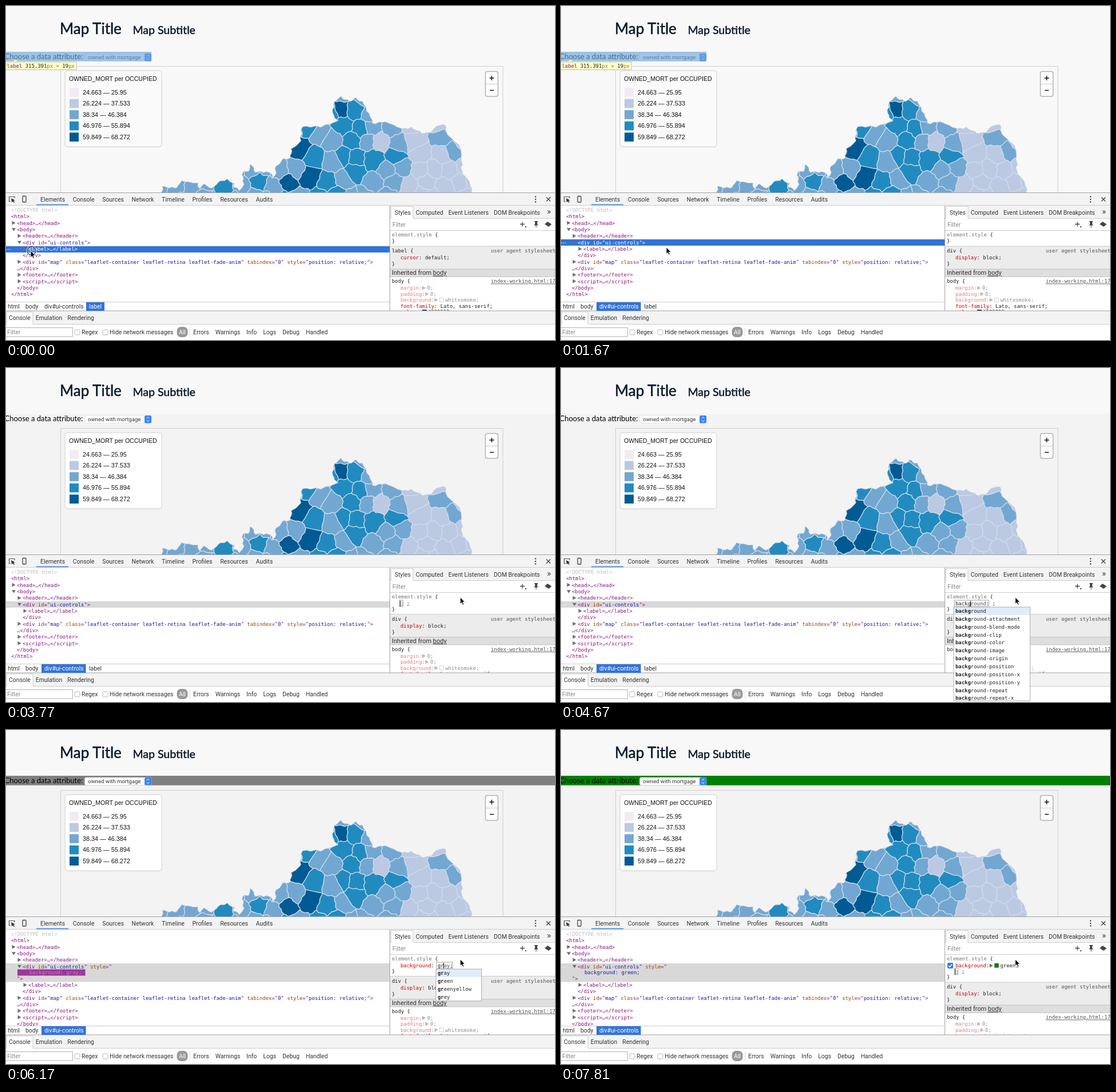
Write an HTML page that moves like this. It is 959 px wide and 584 px high and loops after 8000 ms.

```html
<!DOCTYPE html>
<html lang="en">
<head>
<meta charset="utf-8">
<title>Inspecting a map page</title>
<style>
html, body { margin: 0; width: 100%; height: 100%; overflow: hidden; background: #f8f8f8; }
#stage { position: absolute; left: 0; top: 0; display: block; }
text { white-space: pre; }
.ui { font-family: Roboto, sans-serif; font-size: 10.4px; fill: #333; }
.code { font-family: "DejaVu Sans Mono", monospace; font-size: 8.93px; fill: #222; }
.page { font-family: Lato, sans-serif; fill: #0a1929; }
.legend { font-family: "Liberation Sans", Arial, sans-serif; font-size: 10.8px; fill: #111; }
</style>
</head>
<body>
<svg id="stage" width="959" height="584" viewBox="0 0 959 584"></svg>
<script>
const LOOP = 8000, STEP = 150, CH = 5.377, ROW = 11.33;
const PURPLE = '#881280', BLUE = '#3273d8', RED = '#c80000';
const PALE = '#f1ebf4', LIGHT = '#bcc9e3', MID = '#72a7d2', DEEP = '#218bc0', DARK = '#005b94';

// Markup helpers
const esc = s => s.replace(/</g, '&lt;').replace(/>/g, '&gt;');
const rect = (x, y, w, h, fill, more = '') =>
  `<rect x="${x}" y="${y}" width="${w}" height="${h}" fill="${fill}" ${more}/>`;
const dot = (x, y, r, fill, more = '') => `<circle cx="${x}" cy="${y}" r="${r}" fill="${fill}" ${more}/>`;
const path = (d, fill, more = '') => `<path d="${d}" fill="${fill}" ${more}/>`;
const line = (d, color, width = 1) => path(d, 'none', `stroke="${color}" stroke-width="${width}"`);
const rule = (y, color, x = 0, end = 959) => line(`M${x} ${y}H${end}`, color);
const raw = (cls, x, y, s, more = '') => `<text class="${cls}" x="${x}" y="${y}" ${more}>${s}</text>`;
const ink = c => c ? `style="fill:${c}"` : '';
const ui = (x, y, s, color) => raw('ui', x, y, esc(s), ink(color));
const code = (x, y, s, color) => raw('code', x, y, esc(s), ink(color));
const flow = (x, y, gap, names) => raw('ui', x, y, names.split(', ').join(`<tspan dx="${gap}"></tspan>`)
  .replace(/<\/tspan>([^<]*)/g, '$1</tspan>'));
const span = (s, c) => `<tspan style="fill:${c}">${s}</tspan>`;
const tint = s => esc(s).replace(/([\w-]+)="([^"]*)("?)/g,
  (_, name, value, end) => `${span(name, '#994500')}="${span(value, '#1a1aa6')}${end}`);
const clip = (x, y, w, h, body) =>
  `<svg x="${x}" y="${y}" width="${w}" height="${h}" viewBox="${x} ${y} ${w} ${h}">${body}</svg>`;
const tri = (x, y, open) => path(open ? `M${x} ${y - 2.5}h7l-3.5 5.5z` : `M${x + .5} ${y - 3.5}l6 3.5-6 3.5z`, '#6e6e6e');
const box = (x, y) => rect(x, y, 9, 9, '#fff', 'rx="1.5" stroke="#b5b5b5"');

// Map: Voronoi counties clipped to the coast line
const COAST = '272 327 274 316 288 318 300 317 306 306 334 310 338 318 347 312 360 320 370 308 385 303 398 310 398 317 408 322 415 313 413 291 423 288 428 278 436 290 463 291 466 301 471 297 471 281 485 268 497 266 499 251 514 237 517 211 549 211 580 201 570 188 574 166 584 159 600 167 608 161 622 167 634 188 641 206 662 202 692 215 708 213 727 222 739 222 757 208 767 209 770 224 793 245 797 277 795 286 812 314 814 327';
const KEYS = [
  { fill: DARK, at: '586 180 513 251 490 306 530 297' },
  { fill: DEEP, at: '607 181 620 216 440 306 380 316' },
  { fill: MID, at: '764 229 781 254 548 221 572 272' },
  { fill: LIGHT, at: '652 237' }
];
const pairs = s => s.match(/\d+ \d+/g).map(p => p.split(' ').map(Number));
let seed = 11;
const random = () => (seed = seed * 16807 % 2147483647) / 2147483647;

function countyColor(x, y) {
  if (x > 697) return LIGHT;
  const core = Math.hypot((x - 575) / 70, (y - 255) / 95) < 1;
  return random() < (core ? .87 : .06) ? DEEP : MID;
}
function makeSites() {
  const sites = KEYS.flatMap(k => pairs(k.at).map(([x, y]) => ({ x, y, fill: k.fill })));
  for (let row = 0; row < 8; row++) {
    for (let col = 0; col < 20; col++) {
      const x = 268 + (col + row % 2 / 2) * 29 + (random() - .5) * 16;
      const y = 160 + row * 25 + (random() - .5) * 14;
      if (sites.every(s => Math.hypot(s.x - x, s.y - y) > 19)) sites.push({ x, y, fill: countyColor(x, y) });
    }
  }
  return sites;
}
function cut(poly, s, q) {
  const side = ([x, y]) => (x - (s.x + q.x) / 2) * (q.x - s.x) + (y - (s.y + q.y) / 2) * (q.y - s.y);
  return poly.flatMap((a, i) => {
    const b = poly[(i + 1) % poly.length], da = side(a), db = side(b), k = da / (da - db);
    const kept = da <= 0 ? [a] : [];
    if (da * db < 0) kept.push([a[0] + (b[0] - a[0]) * k, a[1] + (b[1] - a[1]) * k]);
    return kept;
  });
}
// Bends edges by position, so that neighbours stay joined
function shape(poly) {
  const points = poly.flatMap(([ax, ay], i) => {
    const [bx, by] = poly[(i + 1) % poly.length];
    return [0, .25, .5, .75].map(k => {
      const x = ax + (bx - ax) * k, y = ay + (by - ay) * k;
      return (x + 1.2 * Math.sin(y * .5 + x * .2)).toFixed(1) + ' ' + (y + 1.2 * Math.sin(x * .45)).toFixed(1);
    });
  });
  return `M${points.join('L')}Z`;
}
function makeMap() {
  const sites = makeSites(), coast = shape(pairs(COAST));
  const counties = sites.map(s => {
    const square = [[-60, -60], [60, -60], [60, 60], [-60, 60]].map(([x, y]) => [s.x + x, s.y + y]);
    const cell = sites.reduce((poly, q) => q === s ? poly : cut(poly, s, q), square);
    return path(shape(cell), s.fill, 'stroke="#d0dde9" stroke-width="1.2"');
  });
  return `<clipPath id="coast"><path d="${coast}"/></clipPath><g clip-path="url(#coast)">${counties.join('')}</g>` +
    line(coast, '#b9cde2', .8);
}
const MAP = makeMap();

const CLASSES = { '24.663 — 25.95': PALE, '26.224 — 37.533': LIGHT, '38.34 — 46.384': MID, '46.976 — 55.894': DEEP, '59.849 — 68.272': DARK };
const LEGEND = raw('legend', 110, 131, 'OWNED_MORT per OCCUPIED', 'style="font-size:10.54px"') +
  Object.entries(CLASSES).map(([s, c], i) => rect(111, 143 + i * 19.6, 16, 15.6, c) + raw('legend', 134, 154.5 + i * 19.6, s)).join('');
const title = (x, size, s) => raw('page', x, 49.3, s, `style="font-size:${size}px" stroke="#0a1929" stroke-width=".5"`);
const HEADING = title(94, 26, 'Map Title') + title(221.5, 19.5, 'Map Subtitle');
const ZOOM = rect(837.5, 114.5, 22, 43.5, '#fff', 'rx="3" stroke="#b4b4b4" stroke-width="1.6"') +
  rule(136.5, '#ccc', 838, 859) + line('M844.5 126h8M848.5 122v8M845 147.5h7', '#111', 1.5);
const SELECT = rect(137.5, 83, 116.5, 13.5, '#fff', 'rx="2.5" stroke="#d8d8d8" stroke-width=".6"') +
  raw('ui', 143, 93, 'owned with mortgage', 'style="font-size:9.55px"') +
  rect(242, 83, 12, 13.5, '#3b86f2', 'rx="2.5"') + line('M246 88l2-2.3 2 2.3M246 91.3l2 2.3 2-2.3', '#fff');

function tooltip(isDiv) {
  const y = isDiv ? 100 : 98, [w, h] = isDiv ? [1185, 21] : [315.391, 19];
  const name = isDiv ? span('div', PURPLE) + span('#ui-controls', '#1a1aa6') : span('label', PURPLE);
  return path(`M12 ${y}l4.5-4.5 4.5 4.5z`, '#ffffc8') +
    rect(-1, y, isDiv ? 161 : 124, 13.5, '#ffffc8', 'stroke="#b5b58c" stroke-width=".8"') +
    raw('code', 1.5, y + 10, `${name} ${w}${span('px × ', '#777')}${h}${span('px', '#777')}`);
}
function page({ hover, bar }) {
  let s = rect(0, 0, 959, 80, '#f8f8f8') + HEADING + rect(0, 80, 959, 247, hover ? '#f8f8f8' : '#f3f3f3') +
    line('M95.5 327V105.5H868V327', '#cfcfcf') + MAP +
    rect(102, 112, 171, 135.5, '#e4e4e4', 'rx="6"') + rect(104, 114, 167, 131, hover ? '#fafafa' : '#fff', 'rx="4"') + LEGEND + ZOOM;
  if (bar) s += rect(0, 80, 959, 16.7, bar);
  s += raw('page', -2.5, 92.5, 'Choose a data attribute:', 'style="font-size:13px;fill:#000"') + SELECT;
  if (hover) s += rect(0, 80, hover === 'div' ? 959 : 254, 16.7, 'rgba(111,168,220,.66)') + tooltip(hover === 'div');
  return s;
}

// Fixed parts of the tool window
const ICONS = line('M8 342H5.5V333.5H15V336', '#555', 1.2) + path('M9 336l7 4-3 .6 2 2.4-1.2 1-2-2.5-1.8 2z', '#333') +
  rect(29, 332.5, 6, 10.5, 'none', 'rx="1" stroke="#444" stroke-width="1.3"') +
  [-4.5, 0, 4.5].map(d => dot(925, 338 + d, 1.2, '#444')).join('') + line('M944 334.5l7 7m0-7l-7 7', '#444', 1.4) +
  raw('ui', 945, 364, '»', 'style="font-size:15px"') + line('M898 381.5h8M902 377.5v8', '#444', 1.3) + path('M907 385h2v2h-2z', '#444') +
  path('M923 376h6v1l-1 1v3.500l2 2h-3.500v4h-1v-4H922l2-2V378l-1-1z', '#444') + path('M941 381.5l5-4.5 7 4.5-5 4.5z', '#444');
const FRAME = rect(0, 327, 959, 257, '#fff') + rect(0, 327, 959, 21.5, '#f3f3f3') + rule(326.5, '#a3a3a3') + rule(348.5, '#ccc') +
  flow(60, 342, 13.7, 'Elements, Console, Sources, Network, Timeline, Profiles, Resources, Audits') + rect(53, 346.5, 56, 2, '#5b93e6') +
  rect(671, 349, 288, 22.5, '#f3f3f3') + rule(371.5, '#ccc', 671) + rule(392.5, '#ccc', 671) +
  rect(672.5, 350.5, 38.5, 22, '#fff') + line('M672.5 371V350.5H711V371', '#ccc') +
  flow(679, 364.5, 8.8, 'Styles, Computed, Event Listeners, DOM Breakpoints') + ui(675, 385.5, 'Filter', '#8a8a8a') + ICONS +
  rule(517.5, '#ccc', 0, 671) + rect(0, 533, 959, 23.5, '#f3f3f3') + rule(533, '#a3a3a3') + rule(556.5, '#ccc') +
  rect(1, 535, 46, 22, '#fff') + line('M1 556V535H47V556', '#ccc') + flow(5, 549.2, 9, 'Console, Emulation, Rendering') +
  rect(-1, 562.5, 117.5, 15.5, '#fff', 'stroke="#b0b0b0"') + ui(2, 574, 'Filter', '#8a8a8a') +
  box(120, 566) + ui(132, 574, 'Regex') + box(169, 566) + ui(181, 574, 'Hide network messages') +
  rect(298.5, 561, 19, 18, '#999', 'rx="7"') + ui(302, 574, 'All', '#fff') + line('M321.5 562v16', '#ddd') +
  flow(327, 574, 11, 'Errors, Warnings, Info, Logs, Debug, Handled');

// Element tree: leading spaces give the depth, + is closed and - is open
const TREE = `<!DOCTYPE html>
<html>
 +<head>…</head>
 -<body>
  +<header>…</header>
  -<div id="ui-controls">
   +<label>…</label>
  </div>
  +<div id="map" class="leaflet-container leaflet-retina leaflet-fade-anim" tabindex="0" style="position: relative;">
 …</div>
  +<footer>…</footer>
  +<script>…<\/script>
 </body>
</html>`.split('\n').map(s => s.match(/^( *)([+-]?)(.*)$/).slice(1));
const DIV = 5, LABEL = 6;

function crumb(x, name, pad, w, on) {
  return (on ? rect(x - pad, 518, w, 15, BLUE) : '') + ui(x, 529, name, on && '#fff');
}
function tree({ selected, active, styled, flash }) {
  const y = i => 356.7 + i * ROW + (styled && i > DIV ? 21 : 0);
  let s = rect(0, Math.round(y(selected) - 5), 670, styled ? 32.5 : 11, active ? BLUE : '#d8d8d8');
  s += [0, 1, 2].map(i => dot(1.2 + 3 * i, y(selected) + 1, .8, active ? '#dfe9fa' : '#f5f5f5')).join('');
  TREE.forEach(([depth, sign, src], i) => {
    const x = 9 + 10 * depth.length, on = active && i === selected;
    const text = i === DIV && styled ? src.replace('>', ' style="') : src;
    if (sign) s += tri(x - 9, y(i), sign === '-');
    s += raw('code', x, y(i) + 3.2, on ? esc(text) : tint(text), ink(on ? '#fff' : i ? PURPLE : '#bdbdbd'));
  });
  if (styled) {
    const fading = flash < 1, mix = (a, b) => Math.round(a + (b - a) * flash);
    if (fading) s += rect(20, 418.5, 118.5, 11, `rgb(${mix(158, 245)},${mix(54, 219)},${mix(153, 240)})`);
    s += code(41, 427.2, `background: ${styled};`, fading ? '#b67fc4' : '#1a1aa6') + code(19, 437.7, '">', PURPLE);
  }
  return clip(0, 349, 670, 168, s) + crumb(3, 'html') + crumb(34, 'body') +
    crumb(67, 'div#ui-controls', 5, 77.5, selected === DIV) + (styled ? '' : crumb(145, 'label', 5, 32, selected === LABEL));
}

// Inline editor with a caret behind the typed letters
function editor(x, y, { text, typed, caret }) {
  return rect(x - 2, y - 6, text.length * CH + 6.5, 11, '#fff', 'stroke="#9a9a9a" stroke-width=".9"') +
    raw('code', x, y + 3.2, text.slice(0, typed) + span(text.slice(typed), '#555')) +
    (caret ? rect(x - .8 + typed * CH, y - 5, 1, 10, '#000') : '');
}
const nameEditor = (y, edit) => editor(689, y, edit) + code(689 + edit.text.length * CH, y + 3.2, ': ;');

function popup(x, items, typed, chars, chosen) {
  const pitch = 13.85, h = Math.min(164, items.length * pitch + .4), w = chars * CH + 20.5;
  const rows = items.map((name, i) => raw('code', x + 3, 428 + i * pitch,
    `<tspan font-weight="700">${name.slice(0, typed)}</tspan>${name.slice(typed)}`)).join('');
  return clip(x, 418, w, h, rect(x, 418, w, h, '#fff') + (chosen ? rect(x, 418, w, 14, '#e1ecfb') : '') + rows) +
    rect(x, 418, w, h, 'none', 'stroke="#a5a5a5" stroke-width=".9"');
}

function property(y, name, value, swatch) {
  const x = 689 + (name.length + 1) * CH;
  return code(689, y, name, RED) + code(x - CH, y, ':') + tri(x, y - 3.2) +
    (swatch ? rect(x + 9, y - 7.2, 7.5, 7.5, swatch, 'stroke="#888" stroke-width=".6"') : '') +
    code(x + (swatch ? 19 : 9), y, value + ';');
}
function styles({ stage, onDiv, edit }) {
  const shift = [0, 10.5, 10.5, 21][stage];
  const [tag, prop, value] = onDiv ? ['div', 'display', 'block'] : ['label', 'cursor', 'default'];
  let s = raw('code', 674, 402.5, span('element.style', '#777') + ' {') + code(674, 414.3 + shift, '}');
  if (stage === 1) s += nameEditor(412, edit);
  if (stage === 2) s += raw('code', 689, 415.2, span('background', RED) + ':') + editor(754, 412, edit) + code(754 + edit.text.length * CH, 415.2, ';');
  if (stage === 3) {
    s += rect(675, 407, 10, 10, '#2f7de6', 'rx="2"') + line('M677 412l2.2 2.5 4-5', '#fff', 1.4) +
      property(415.2, 'background', 'green', '#008000') + nameEditor(422.7, edit);
  }
  s += `<g transform="translate(0 ${shift})">` + rect(671, 420, 288, 40, '#ececec') + rule(420, '#ccc', 671) +
    code(674, 431.2, tag + ' {') + code(847, 431.2, 'user agent stylesheet', '#555') +
    raw('code', 689, 443, span(prop, RED) + `: ${value};`) + code(674, 454, '}') +
    rect(671, 460, 288, 13.5, '#dedede') + rule(460, '#c4c4c4', 671) + rule(473.5, '#c4c4c4', 671) +
    raw('ui', 674, 470.4, 'Inherited from <tspan text-decoration="underline">body</tspan>', 'style="font-size:11px"') +
    code(674, 484.4, 'body {') + raw('code', 847, 484.4, 'index-working.html:17', 'text-decoration="underline" style="fill:#555"') +
    `<g opacity=".5">${property(496.2, 'margin', '0')}${property(506.7, 'padding', '0')}${property(517.2, 'background', 'whitesmoke', '#f5f5f5')}</g>` +
    raw('code', 689, 527.7, span('font-family', RED) + ': Lato, sans-serif;') +
    raw('code', 689, 538.2, span('color', RED) + ':') + rect(727, 531, 8, 8, '#111') + code(737, 538.2, '#222222;') + '</g>';
  return clip(671, 393, 288, 139.5, s);
}

function pointer(x, y, click) {
  const ring = click ? dot(x + 1.5, y, 8, 'rgba(255,255,255,.15)', 'stroke="#fff" stroke-width="2"') +
    dot(x + 1.5, y, 7.6, 'none', 'stroke="#1b2f55" stroke-width="1.1"') : '';
  return ring + path(`M${x} ${y}v11.5l2.6-2.4 1.9 4.2 1.9-.9-1.9-4.1h3.6z`, '#000', 'stroke="#fff" stroke-width=".8"');
}

// Motion
const clamp = (v, a, b) => Math.max(a, Math.min(b, v));
const progress = (t, from, to) => clamp((t - from) / (to - from), 0, 1);
const held = (t, from) => from + Math.floor((t - from) / STEP) * STEP;
const ease = (u, p = 2.4) => u < .5 ? (2 * u) ** p / 2 : 1 - (2 - 2 * u) ** p / 2;
const count = (t, from, max) => clamp(Math.floor((t - from) / STEP) + 1, 0, max);

function pointerAt(t) {
  if (t < 1370) return [43 - progress(t, 140, 620), 428 - 15 * progress(held(t, 20), 20, 620)];
  const e = ease(progress(held(t, 1370), 1220, 2570));
  return [42 + 751.5 * e, 413 - 12 * e + 20 * Math.sin(Math.PI * e)];
}

const PROPS = ['backface-visibility', 'background', ...'attachment blend-mode clip color image origin position position-x position-y repeat repeat-x'.split(' ').map(s => 'background-' + s)];
const COLORS = 'aliceblue antiquewhite aqua aquamarine azure beige bisque black blanchedalmond blue blueviolet brown'.split(' ');
const GREENS = 'gainsboro ghostwhite gold goldenrod gray green greenyellow grey'.split(' ');
const matching = (list, word, typed) => list.filter(s => s.startsWith(word.slice(0, typed)));

function scene(t) {
  const [x, y] = pointerAt(t);
  const hover = x > 670 ? '' : y < 419 ? 'div' : 'label';
  const stage = t < 2870 ? 0 : t < 5570 ? 1 : t < 7210 ? 2 : 3;
  const blinkOff = (t >= 3170 && t < 3770) || (t >= 7510 && t < 7810);
  const edit = { text: '', typed: 0, caret: !blinkOff };
  let list = '', bar = stage === 3 ? 'green' : '', changed = 7210;
  if (stage === 1 && t >= 4070) {
    edit.typed = count(t, 4070, 9);
    const items = matching(PROPS, 'background', edit.typed).slice(0, 12);
    edit.text = items[0];
    list = popup(686, items, edit.typed, edit.typed < 2 ? 26 : 21, true);
  } else if (stage === 2 && t < 6020) {
    list = popup(751, COLORS, 0, 20, false);
  } else if (stage === 2) {
    edit.typed = count(t, 6020, 5);
    const items = matching(GREENS, 'green', edit.typed);
    edit.text = bar = items[0];
    changed = 6020 + STEP * (Math.min(3, edit.typed) - 1);
    list = popup(751, items, edit.typed, 11, true);
  }
  return page({ hover, bar }) + FRAME +
    tree({ selected: t < 920 ? LABEL : DIV, active: stage === 0, styled: bar, flash: progress(held(t, changed), changed, changed + 4 * STEP) }) +
    styles({ stage, onDiv: t >= 1070, edit }) + line('M670.5 349V533', '#a3a3a3') + list +
    pointer(x, y, t < 140 || (t >= 920 && t < 1070) || (t >= 2720 && t < 2870));
}

const svg = document.getElementById('stage');
const start = performance.now();
let shown = '';
function tick() {
  const next = scene((performance.now() - start) % LOOP);
  if (next !== shown) svg.innerHTML = shown = next;
  requestAnimationFrame(tick);
}
tick();
</script>
</body>
</html>
```
